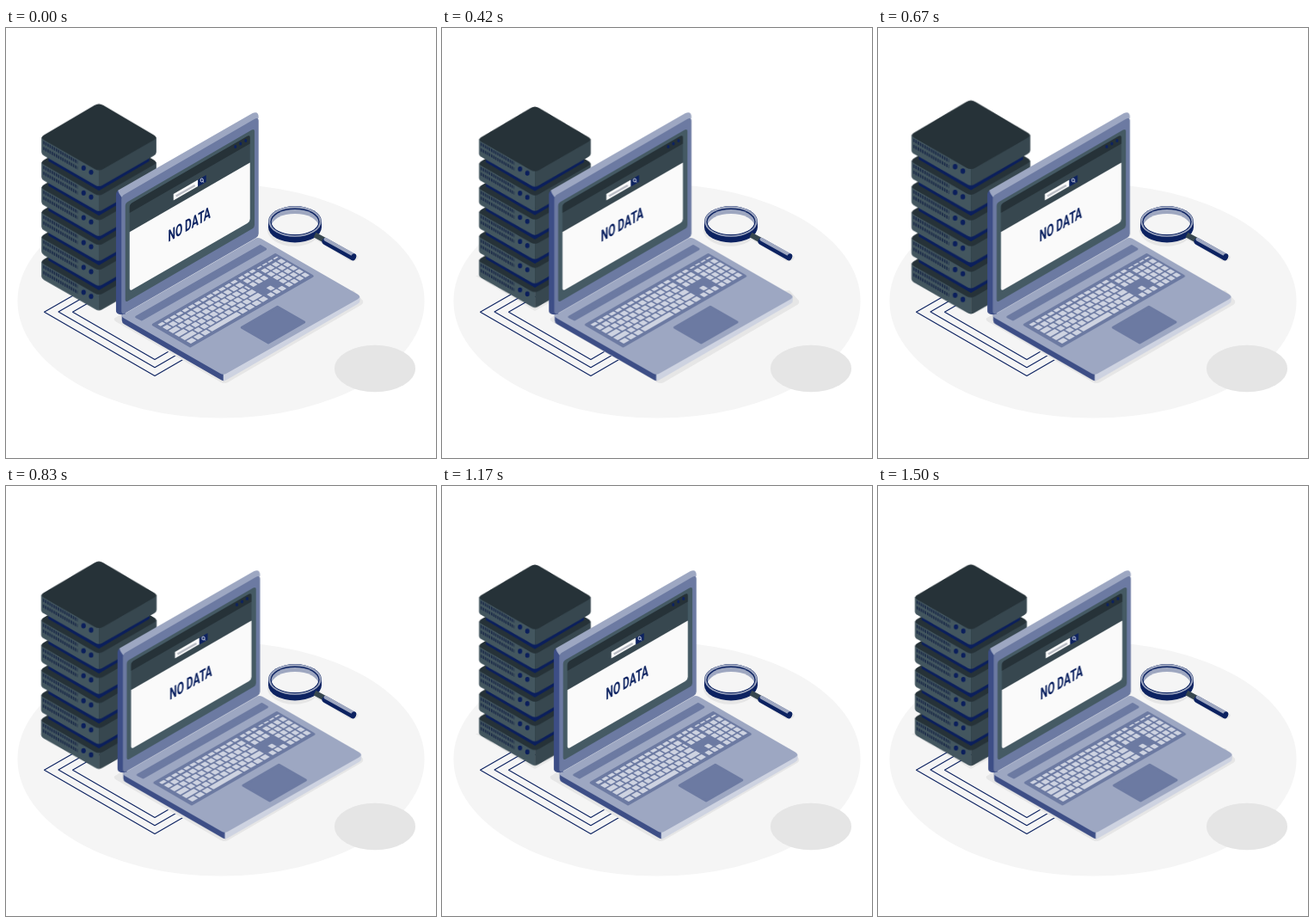
Write an HTML page that moves like this. It is 500 px wide and 500 px high and loops after 1.54 s.

```html
<!DOCTYPE html>
<html lang="en">
<head>
<meta charset="utf-8">
<title>No data</title>
<style>
  html, body { margin: 0; width: 100%; height: 100%; overflow: hidden; background: #fff; }
  svg { display: block; width: 100vw; height: 100vh; }
  #server { transform-origin: 108px 207px; animation: heartbeat 1540ms linear -42ms infinite; }
  #laptop { animation: shake 1540ms linear -42ms infinite; }
  @keyframes heartbeat {
    0%, 30%, 40%, 60%, 100% { transform: scale(1); }
    10%, 50% { transform: scale(1.1); }
  }
  @keyframes shake {
    0%, 100% { transform: translateX(0); }
    10%, 90% { transform: translateX(-1px); }
    20%, 80% { transform: translateX(2.6px); }
    30%, 50%, 70% { transform: translateX(-4px); }
    40%, 60% { transform: translateX(4px); }
  }
  .join { stroke-linejoin: round; }
</style>
</head>
<body>
<svg viewBox="0 0 500 500">
  <defs>
    <path id="slab" d="M51 119 L108 152 L165 119 V128 L108 161.500 L51 128Z" fill="#0b1f5c"/>
    <g id="unit">
      <path d="M43 129 V146 Q43 148.500 46 150.200 L104 183.300 Q106 184.500 108 184.500 V160Z" fill="#43565f"/>
      <path d="M173 129 V146 Q173 148.500 170 150.200 L112 183.300 Q110 184.500 108 184.500 V160Z" fill="#37474f"/>
      <path d="M46 126.600 L103 93 Q108 90 113 93 L170 126.600 Q175 129.500 170 132.300 L113 165 Q108 168 103 165 L46 132.300 Q41 129.500 46 126.600Z" fill="#263238"/>
      <path d="M45 134.500 H84 M45 141 H84" transform="matrix(1 .577 0 1 0 -25.500)" stroke="#1b2a48" stroke-width="3.600" stroke-dasharray="1.500 .9"/>
      <ellipse cx="90.700" cy="164" rx="2.500" ry="2.900" fill="#0b1f5c"/>
      <ellipse cx="99.200" cy="168.700" rx="2.500" ry="2.900" fill="#0b1f5c"/>
    </g>
  </defs>

  <ellipse cx="250" cy="317.500" rx="236.600" ry="136" fill="#f5f5f5"/>
  <ellipse cx="429" cy="396" rx="47" ry="27.300" fill="#e5e5e5"/>
  <path d="M39 288 L108 329 L140 311 L108 280Z" fill="#e9e9e9"/>
  <g fill="none" stroke="#0c2261" stroke-width="1.100" class="join">
    <path d="M120 287 L44.500 330.300 L173 404.500 L230 371.600"/>
    <path d="M120 296 L61 330 L173 394.700 L225 364.700"/>
    <path d="M120 305.700 L77.500 330.200 L173 385.400 L215 361"/>
  </g>

  <g id="server"></g>

  <path d="M126 337.500 L135 332 L404 305 L415 317 Q416 320 413 322 L258 412 Q254 414 250 412 L128 341.500 Q125 339.500 126 337.500Z" fill="#e6e6e6"/>

  <g id="glass">
    <path d="M305 230 A31 19 0 0 0 360 246 L400 271 Q409 272 410 266 L367 242Z" fill="#e6e6e6"/>
    <path d="M305 225 A31 18 0 0 1 367 225 V231.500 A31 18 0 0 1 305 231.500Z" fill="#0c2261"/>
    <ellipse cx="336" cy="225" rx="30.700" ry="17.800" fill="#9ea7c0"/>
    <ellipse cx="336" cy="225.300" rx="28.600" ry="15.900" fill="#0c2261"/>
    <clipPath id="hole"><ellipse cx="336" cy="225.500" rx="27.300" ry="14.600"/></clipPath>
    <g clip-path="url(#hole)">
      <path d="M305 205 H367 V245 H305Z" fill="#9ea7c0"/>
      <ellipse cx="336" cy="230.500" rx="27.300" ry="14.600" fill="#f5f5f5"/>
    </g>
    <path d="M359 240.500 L371 247" stroke="#37474f" stroke-width="6"/>
    <g fill="none" stroke-linecap="round">
      <path d="M371.500 248.300 L403 266" stroke="#0c2261" stroke-width="8"/>
      <path d="M371.500 245.800 L403.500 263.600" stroke="#9ea7c0" stroke-width="4"/>
    </g>
    <ellipse cx="404" cy="266.300" rx="3" ry="4.200" fill="#0c2261" transform="rotate(25 404 266.300)"/>
  </g>

  <g id="laptop">
    <path d="M135 333 V340 Q135 342.800 138 344.600 L250 409 Q252 410.300 254 410.300 V398Z" fill="#3d4e86"/>
    <path d="M412 312 V317 Q412 319.500 409 321 L257 409 Q255 410.300 253 410.300 V398Z" fill="#ced3e1"/>
    <path d="M137 333 L290 245 Q293 243 297 245 L409 309.500 Q414 312.500 409 315.500 L257 401.500 Q253 404 249 401.500 L137 337.200 Q133 335 137 333Z" fill="#9da7c2"/>
    <g fill="#6c7aa2" stroke="#6c7aa2" stroke-width="3" class="join">
      <path d="M152 336 L296 253.500 L302 257 L158 339Z"/>
      <path d="M171.500 345 L313.500 263.500 L356.500 288.500 L214.500 370Z"/>
      <path d="M274.500 348.300 L316 324.200 L347 342 L305.300 366Z"/>
    </g>
    <g id="keys" transform="matrix(.866 -.5 .866 .5 170 345)" fill="#ced3e1"></g>

    <path d="M128 195 Q128 190 132 188 L140 193 L139 332.500 Q128 335 128 328Z" fill="#3d4e86"/>
    <path d="M130.500 188.800 L287 99 Q294 96 294 104 L290 112 L135 197 Q131 192 130.500 188.800Z" fill="#9da7c2"/>
    <path d="M134.500 199 Q134.500 195.500 138 193.500 L289 106 Q294 103.500 294 108 V239 Q294 242 291 244 L140 331 Q134.500 334 134.500 329Z" fill="#6c7aa2"/>
    <path d="M139 207 Q139 203.500 142 202 L286 118.500 Q289.300 117 289.300 120 V229 Q289.300 232 286.500 233.500 L142 317.500 Q139 319 139 316Z" fill="#455a64"/>
    <path d="M144 208.500 Q144 205 147 203.300 L281 125.800 Q284 124 284 127.500 V158 L144 239Z" fill="#37474f"/>
    <path d="M144 208.500 Q144 205 147 203.300 L281 125.800 Q284 124 284 127.500 V134.500 L144 215Z" fill="#263238"/>
    <path d="M144 237.300 L284 156.500 V222 Q284 225 281 227 L147 304.300 Q144 306 144 302.500Z" fill="#fafafa"/>
    <g fill="#0c2261">
      <ellipse cx="267" cy="138" rx="1.500" ry="2"/>
      <ellipse cx="273" cy="134.500" rx="1.500" ry="2"/>
      <ellipse cx="279" cy="131" rx="1.500" ry="2"/>
    </g>
    <path d="M195 193 L223.500 176.500 V184 L195 200.500Z" fill="#fafafa"/>
    <path d="M198 195.500 L220 183" stroke="#b9bcc4" stroke-width="2.200"/>
    <path d="M223.500 176.500 L233 171 V179 L223.500 184.500Z" fill="#0c2261"/>
    <ellipse cx="228" cy="177" rx="1.600" ry="2" fill="none" stroke="#fff" stroke-width=".8"/>
    <path d="M229.200 178.500 L230.500 179.500" stroke="#fff" stroke-width=".8"/>
    <text transform="matrix(.63 -.364 0 1 188.700 249)" font-family="Roboto, Arial, sans-serif" font-size="19" font-weight="700" fill="#0c2261">NO DATA</text>
  </g>
</svg>
<script>
  const add = (parent, tag, attrs) => {
    const el = document.createElementNS('http://www.w3.org/2000/svg', tag);
    for (const name in attrs) el.setAttribute(name, attrs[name]);
    parent.append(el);
  };

  // Stack the units from the floor up, with a narrow slab in each gap.
  const server = document.getElementById('server');
  for (let i = 5; i >= 0; i--) {
    const transform = `translate(0 ${i * 28.1})`;
    add(server, 'use', { href: '#unit', transform });
    if (i) add(server, 'use', { href: '#slab', transform });
  }

  const keys = document.getElementById('keys');
  const gap = 1.8;
  const key = (x, y, width, height = 6.2) =>
    add(keys, 'rect', { x, y, width: width - gap, height, rx: 0.6 });
  const run = (x, y, count, pitch, height) => {
    for (let i = 0; i < count; i++) key(x + i * pitch, y, pitch, height);
  };
  const rowY = row => 10 + row * 8;

  // Main block: each row opens with a wider key and closes at the same edge.
  const left = 4, right = 110, pitch = 8.15;
  run(left, 3.5, 13, pitch, 4);
  [8.15, 12, 14, 18].forEach((lead, row) => {
    const count = row ? 12 - row : 11;
    const end = left + lead + count * pitch;
    key(left, rowY(row), lead);
    run(left + lead, rowY(row), count, pitch);
    key(end, rowY(row), right - end);
  });
  run(left, rowY(4), 3, 9.5);
  key(32.5, rowY(4), 41);
  run(73.5, rowY(4), 4, 9.1);

  // Navigation block, arrows and number pad.
  run(112, 3.5, 3, 7.4, 4);
  for (const row of [0, 1, 4]) run(112, rowY(row), 3, 7.4);
  key(119.4, rowY(3), 7.4);
  run(136, 4.5, 4, 7.3, 2);
  for (let row = 0; row < 5; row++) run(136, rowY(row), 4, 7.3);
</script>
</body>
</html>
```
